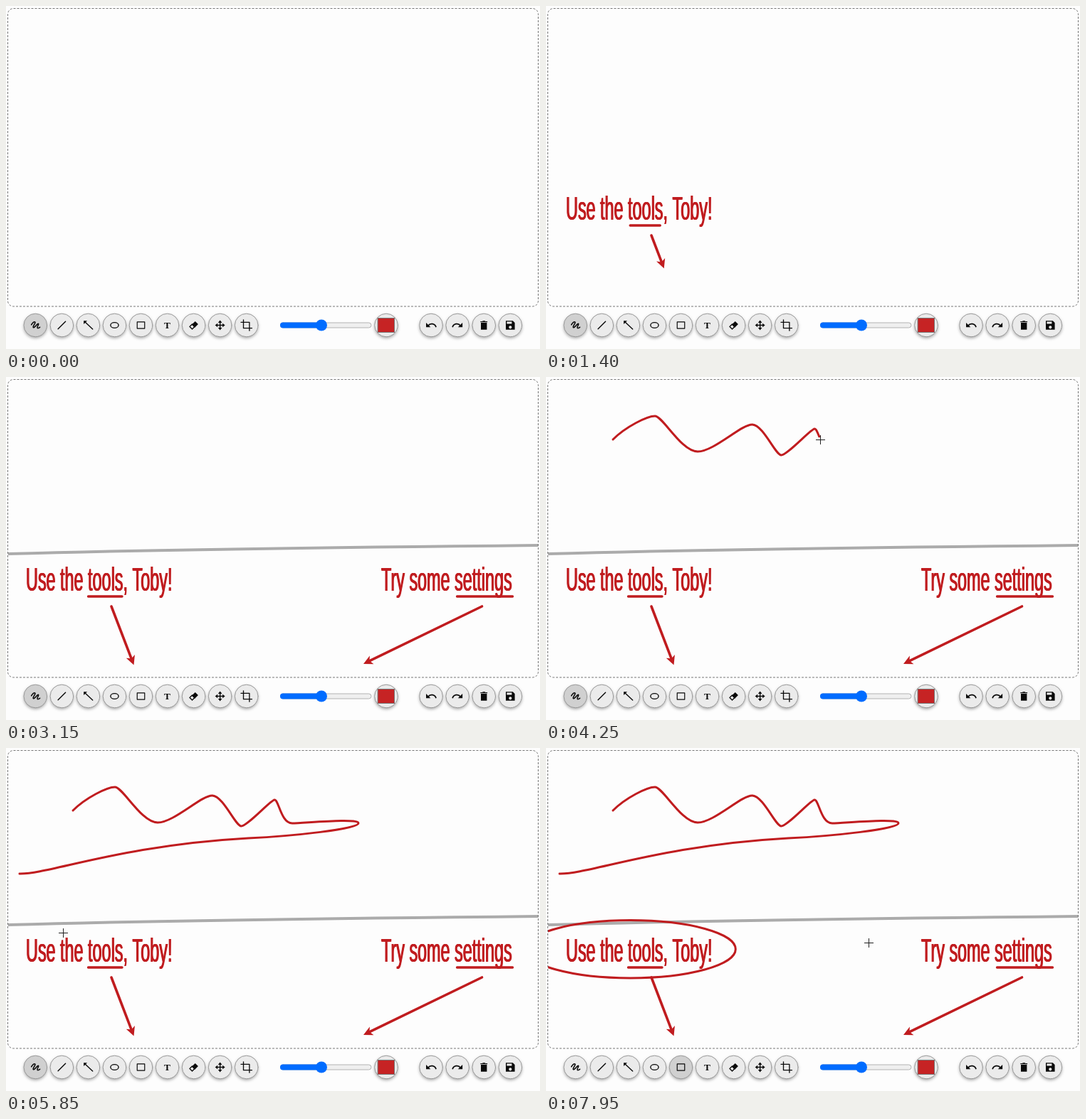
Recreate the animation shown at these times as an HTML page with a canvas. Size 750 by 483 pixels, loop 8000 ms.

```html
<!DOCTYPE html>
<html lang="en">
<head>
<meta charset="utf-8">
<title>Drawing board</title>
<style>
  html, body { margin: 0; width: 100%; height: 100%; overflow: hidden; background: #fdfdfd; }
  canvas { display: block; width: 750px; height: 483px; }
</style>
</head>
<body>
<canvas id="stage"></canvas>
<script>
const W = 750, H = 483, LOOP = 8000, BAR = 449.5;
const PAPER = '#fdfdfd', RED = '#c01c1f', INK = '#0a0a0a';
const canvas = document.getElementById('stage');
const ctx = canvas.getContext('2d');
const dpr = window.devicePixelRatio || 1;
canvas.width = W * dpr;
canvas.height = H * dpr;

const part = (t, start, length) => Math.max(0, Math.min(1, (t - start) / length));
const lerp = (a, b, k) => a + (b - a) * k;
const smooth = x => x * x * (3 - 2 * x);
const easeOut = x => 1 - (1 - x) * (1 - x);

function pen(color, width, cap = 'round') {
  ctx.strokeStyle = ctx.fillStyle = color;
  ctx.lineWidth = width;
  ctx.lineCap = cap;
  ctx.lineJoin = 'round';
}

function segment(x1, y1, x2, y2) {
  ctx.beginPath();
  ctx.moveTo(x1, y1);
  ctx.lineTo(x2, y2);
  ctx.stroke();
}

function disc(x, y, r) {
  ctx.beginPath();
  ctx.arc(x, y, r, 0, Math.PI * 2);
}

// Tall lettering at its natural advance, slightly emboldened sideways.
function lettering(text, x, y, alpha) {
  ctx.save();
  ctx.globalAlpha = alpha;
  ctx.fillStyle = RED;
  ctx.font = '23.4px "Liberation Sans", Arial, sans-serif';
  ctx.translate(x, y);
  ctx.scale(1, 2);
  for (const dx of [-0.5, 0, 0.5]) ctx.fillText(text, dx, 0);
  ctx.restore();
}

function underline(x1, x2, y, k) {
  if (k <= 0) return;
  const mid = (x1 + x2) / 2, half = (x2 - x1) / 2 * k;
  pen(RED, 3.4);
  segment(mid - half, y, mid + half, y);
}

function arrow(x1, y1, x2, y2, k) {
  if (k <= 0) return;
  const length = Math.hypot(x2 - x1, y2 - y1) * k;
  pen(RED, 3.6);
  ctx.save();
  ctx.translate(x1, y1);
  ctx.rotate(Math.atan2(y2 - y1, x2 - x1));
  segment(0, 0, Math.max(0, length - 7), 0);
  ctx.translate(length, 0);
  ctx.fill(new Path2D('M0 0L-13 -6.5L-9.5 0L-13 6.5z'));
  ctx.restore();
}

// Icons live in a 24-unit box.
const fill = d => ctx.fill(new Path2D(d), 'evenodd');
const line = (d, width = 2) => {
  ctx.lineWidth = width;
  ctx.stroke(new Path2D(d));
};

const icons = {
  scribble() { line('M4 11C9 3 14 4 10 10S7 20 13 13S19 9 17 13S15 20 21 16', 2.3); },
  line() { line('M4.5 19.5L19.5 4.5'); },
  arrow() {
    line('M5 5L21 20');
    fill('M3 3h7l-7 7z');
  },
  ellipse() { line('M4 12a8 5.6 0 0 1 16 0a8 5.6 0 0 1 -16 0'); },
  rect() { line('M4.5 5.5h15v13h-15z', 1.7); },
  text() {
    ctx.font = 'bold 19px "Liberation Serif", Times, serif';
    ctx.textAlign = 'center';
    ctx.fillText('T', 12, 18.5);
  },
  eraser() {
    line('M9 10l-5 5l5 5l5 -5');
    fill('M15 4l6 6l-7 7l-6 -6z');
  },
  move() {
    line('M12 5v14M5 12h14');
    fill('M12 2l4 5h-8zM12 22l4-5h-8zM2 12l5-4v8zM22 12l-5-4v8z');
  },
  crop() { line('M6 1v17h17M1 6h17v17', 1.9); },
  undo() {
    ctx.lineCap = 'butt';
    line('M6 13a9 9 0 0 1 16 3', 2.5);
    fill('M2 7v9h9z');
  },
  redo() {
    ctx.translate(24, 0);
    ctx.scale(-1, 1);
    icons.undo();
  },
  trash() { fill('M6 7h12v14h-12zM5 4h4l1-1h4l1 1h4v2h-14z'); },
  save() { fill('M3 3h14l4 4v14h-18zM5 5h10v4h-10zM9 16a3 3 0 0 1 6 0a3 3 0 0 1 -6 0'); }
};
const tools = ['scribble', 'line', 'arrow', 'ellipse', 'rect', 'text', 'eraser', 'move', 'crop'];
const actions = ['undo', 'redo', 'trash', 'save'];

function button(x, active) {
  ctx.save();
  ctx.shadowColor = 'rgba(0, 0, 0, .35)';
  ctx.shadowBlur = 4 * dpr;
  ctx.shadowOffsetY = 2 * dpr;
  ctx.fillStyle = active ? '#d0d0d0' : '#ebebeb';
  disc(x, BAR, 16.3);
  ctx.fill();
  ctx.restore();
  pen('#999', 1);
  disc(x, BAR, 16.3);
  ctx.stroke();
}

function iconButton(name, x, active) {
  button(x, active);
  ctx.save();
  ctx.translate(x, BAR);
  ctx.scale(0.7, 0.7);
  ctx.translate(-12, -12);
  pen(INK, 2);
  icons[name]();
  ctx.restore();
}

function slider() {
  pen('#b2b2b2', 1);
  ctx.fillStyle = '#efefef';
  ctx.beginPath();
  ctx.roundRect(385.5, 446, 127.5, 7, 3.5);
  ctx.fill();
  ctx.stroke();
  ctx.fillStyle = '#006cff';
  ctx.beginPath();
  ctx.roundRect(385, 445.5, 60, 8, 4);
  ctx.fill();
  disc(443, BAR, 8);
  ctx.fill();
}

function toolbar(active) {
  tools.forEach((name, i) => iconButton(name, 41.3 + i * 37.05, name === active));
  slider();
  button(534, false);
  pen('#777', 1);
  ctx.fillStyle = '#c62324';
  ctx.fillRect(522, 439, 24, 21);
  ctx.strokeRect(522.5, 439.5, 23, 20);
  actions.forEach((name, i) => iconButton(name, 597 + i * 37.1, false));
}

const DOODLE = 'M94 88C112 70 142 55 153 55S190 105 213 105S275 66 290 67S322 109 330 110' +
  'S371 74 377 73S386 106 402 106S495 98 495 106S404 124 340 127C160 137 60 178 19 177';
const doodle = new Path2D(DOODLE);
const ruler = document.createElementNS('http://www.w3.org/2000/svg', 'path');
ruler.setAttribute('d', DOODLE);
const doodleLength = ruler.getTotalLength();
const DRAW = 3350, DRAWN = 5500;
const drawn = t => doodleLength * part(t, DRAW, DRAWN - DRAW) ** 1.12;

// Pointer stops after the doodle; each move eases in and out.
const DRAG = 6700, DROP = 7130;
const stops = [
  { t: 5600, x: 19, y: 177 }, { t: 5850, x: 80, y: 260 },
  { t: 6150, x: 152, y: 449 }, { t: 6350, x: 152, y: 449 },
  { t: DRAG, x: 14, y: 254.5 }, { t: DROP, x: 223, y: 312 },
  { t: 7500, x: 190, y: 449 }, { t: 7650, x: 190, y: 449 },
  { t: 7950, x: 453, y: 274 }
];

function pointer(t) {
  if (t < DRAWN) return ruler.getPointAtLength(drawn(t + 10));
  const i = stops.findIndex(s => s.t > t);
  if (i < 1) return i ? stops[stops.length - 1] : stops[0];
  const a = stops[i - 1], b = stops[i], k = smooth(part(t, a.t, b.t - a.t));
  return { x: lerp(a.x, b.x, k), y: lerp(a.y, b.y, k) };
}

function crosshair({ x, y }) {
  if (y > 423) return;
  x = Math.round(x) + 0.5;
  y = Math.round(y) + 0.5;
  pen('#222', 1, 'butt');
  segment(x - 6.5, y, x + 6.5, y);
  segment(x, y - 6.5, x, y + 6.5);
}

// The oval passes through the corners of the dragged box.
function oval(t) {
  const from = pointer(DRAG), to = pointer(Math.min(t - 12, DROP));
  pen(RED, 3);
  ctx.beginPath();
  ctx.ellipse((from.x + to.x) / 2, (from.y + to.y) / 2, Math.abs(to.x - from.x) / Math.SQRT2,
    Math.abs(to.y - from.y) / Math.SQRT2, 0, 0, Math.PI * 2);
  ctx.stroke();
}

function hints(t) {
  ctx.globalAlpha = part(t, 2130, 800);
  pen('#ababab', 4);
  ctx.stroke(new Path2D('M3 249Q260 242 748 237'));
  ctx.globalAlpha = 1;

  lettering('Use the tools, Toby!', 28, 300.5, part(t, 700, 400));
  underline(115.5, 163, 309, easeOut(part(t, 1130, 410)));
  arrow(148, 323, 179.5, 405.5, smooth(part(t, 1130, 500)));

  lettering('Try some settings', 527, 300.5, part(t, 1450, 400));
  underline(633.5, 711.5, 309, easeOut(part(t, 1880, 410)));
  arrow(668.5, 323, 502, 404, smooth(part(t, 1880, 500)));
}

function board(t) {
  ctx.save();
  ctx.beginPath();
  ctx.rect(3, 4, 744.5, 419);
  ctx.clip();
  hints(t);
  if (t > DRAW) {
    pen(RED, 3);
    ctx.setLineDash([drawn(t), doodleLength + 10]);
    ctx.stroke(doodle);
    ctx.setLineDash([]);
  }
  if (t > DRAG + 12) oval(t);
  ctx.restore();

  pen('#777', 1, 'butt');
  ctx.setLineDash([3, 2]);
  ctx.beginPath();
  ctx.roundRect(2.5, 3.5, 745, 419.5, 8);
  ctx.stroke();
  ctx.setLineDash([]);
}

function draw(t) {
  ctx.setTransform(dpr, 0, 0, dpr, 0, 0);
  ctx.fillStyle = PAPER;
  ctx.fillRect(0, 0, W, H);
  board(t);
  toolbar(t < 6250 ? 'scribble' : t < 7550 ? 'ellipse' : 'rect');
  if (t > DRAW - 50) crosshair(pointer(t));
}

const start = performance.now();
function frame() {
  draw((performance.now() - start) % LOOP);
  requestAnimationFrame(frame);
}
frame();
</script>
</body>
</html>
```
